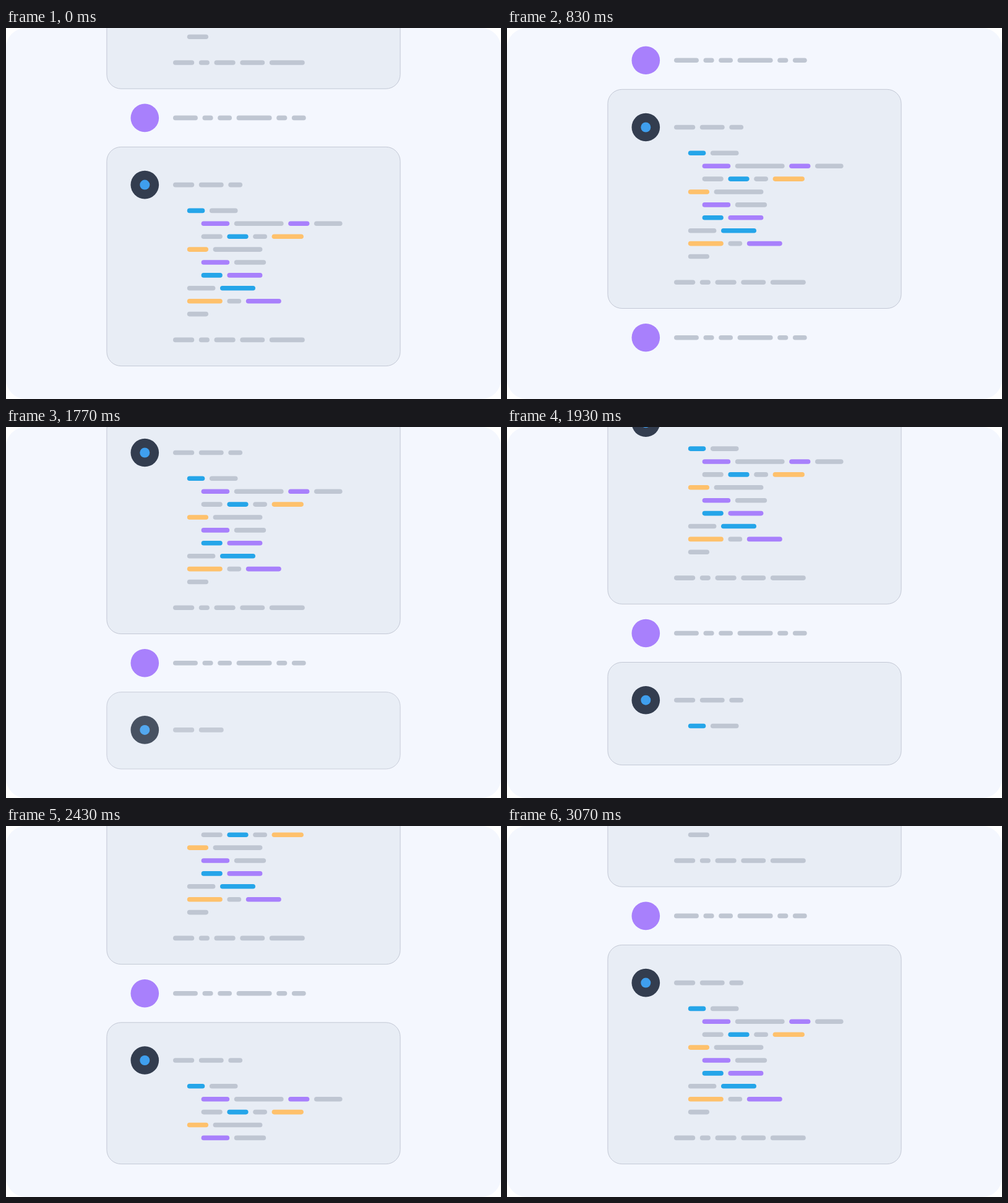
These frames come from a looping animation (800 by 600 pixels, 4100 ms). An HTML page:

```html
<!DOCTYPE html>
<html lang="en">
<head>
<meta charset="utf-8">
<title>Chat scroll</title>
<style>
  html, body { margin: 0; width: 100%; height: 100%; overflow: hidden; background: #fff; }
  svg { display: block; width: 100vw; height: 100vh; }
</style>
</head>
<body>
<svg id="stage" viewBox="0 0 800 600">
  <clipPath id="view"><rect width="800" height="570"/></clipPath>
  <rect width="800" height="600" rx="32" fill="#f4f7fe"/>
  <g clip-path="url(#view)"><g id="feed"></g></g>
</svg>
<script>
const LOOP = 4100, FPS = 30;
const UNIT = 1.9, LINE = 11 * UNIT, PERIOD = 236 * UNIT;
const CARD_TOP = 192.4, CARD_H = 354.2, USER_Y = 145.4;
const USER_STEP = 49 * UNIT, ENTER = 230, USER_AT = 122, CARD_AT = 1622;
const COLORS = { g: '#bfc6d2', b: '#25a5e9', p: '#a880fc', o: '#fec16c' };

// Each row: line number, indent, then colour + width of every dash (in units)
const USER = [0, 0, 'g21 g9 g12 g30 g9 g12'];
const ROWS = [
  [0, 0, 'g18 g21 g12'],
  [2, 12, 'b15 g24'],
  [3, 24, 'p24 g42 p18 g24'],
  [4, 24, 'g18 b18 g12 o27'],
  [5, 12, 'o18 g42'],
  [6, 24, 'p24 g27'],
  [7, 24, 'b18 p30'],
  [8, 12, 'g24 b30'],
  [9, 12, 'o30 g12 p30'],
  [10, 12, 'g18'],
  [12, 0, 'g18 g9 g18 g21 g30']
];

const feed = document.getElementById('feed');

function add(parent, tag, attrs) {
  const el = document.createElementNS('http://www.w3.org/2000/svg', tag);
  for (const key in attrs) el.setAttribute(key, attrs[key]);
  return parent.appendChild(el);
}

function addDashes(parent, [line, indent, spec], y) {
  let x = 270 + indent * UNIT;
  return spec.split(' ').map(s => {
    const width = s.slice(1) * UNIT;
    const dash = add(parent, 'rect', {
      x, y: y + line * LINE - 2 * UNIT, width, height: 4 * UNIT,
      rx: 2 * UNIT, fill: COLORS[s[0]]
    });
    x += width + 4 * UNIT;
    return dash;
  });
}

function addAvatar(parent, y, fill) {
  add(parent, 'circle', { cx: 224.3, cy: y, r: 22.8, fill });
}

function addUser(y) {
  const g = add(feed, 'g');
  addAvatar(g, y, COLORS.p);
  return { g, dashes: addDashes(g, USER, y) };
}

function addCard(top) {
  const g = add(feed, 'g'), y = top + 61.2;
  const box = add(g, 'rect', {
    x: 162.9, y: top, width: 474.2, height: CARD_H, rx: 23,
    fill: '#e8edf5', stroke: '#c3c8d5', 'stroke-width': 1
  });
  addAvatar(g, y, '#333d4f');
  add(g, 'circle', { cx: 224.3, cy: y, r: 8, fill: '#3f9fee' });
  return { g, box, rows: ROWS.map(row => addDashes(g, row, y)) };
}

const oldCard = addCard(CARD_TOP - PERIOD);
addUser(USER_Y);
addCard(CARD_TOP);
const user = addUser(USER_Y + PERIOD);
const card = addCard(CARD_TOP + PERIOD);

// Typing schedule, one step per tick
const typed = [], breaks = [];
user.dashes.forEach((el, i) => typed.push({ el, at: i ? 10 + 2 * i : 0 }));
let tick = 52;
card.rows.forEach((dashes, r) => {
  if (r === 6) tick++;
  if (r) breaks.push({ at: tick++, lines: r === 10 ? 2 : 1 });
  dashes.forEach(el => typed.push({ el, at: tick++ }));
});

const progress = (t, from) => Math.min(1, Math.max(0, (t - from) / ENTER));
const easeOut = (p, power) => 1 - (1 - p) ** power;
const show = (el, on) => el.setAttribute('visibility', on ? 'visible' : 'hidden');

function draw(ms) {
  const n = Math.floor((ms + 3.4) * FPS / 1000);
  const t = n * 1000 / FPS;
  const userP = progress(t, USER_AT), cardP = progress(t, CARD_AT);

  const lines = breaks.reduce((sum, b) => sum + (n >= b.at ? b.lines : 0), 0);
  const left = (11 - lines) * LINE;
  const cardStep = PERIOD - 11 * LINE - USER_STEP;
  const scroll = USER_STEP * easeOut(userP, 3) + cardStep * easeOut(cardP, 3) + lines * LINE;

  feed.setAttribute('transform', `translate(0 ${-scroll})`);
  card.box.setAttribute('height', CARD_H - left);
  user.g.setAttribute('opacity', easeOut(userP, 2.2));
  card.g.setAttribute('opacity', easeOut(cardP, 2.2));
  oldCard.g.setAttribute('display', n < 25 ? 'inline' : 'none');
  typed.forEach(d => show(d.el, n >= d.at));
}

const start = performance.now();
function loop() {
  draw((performance.now() - start) % LOOP);
  requestAnimationFrame(loop);
}
loop();
</script>
</body>
</html>
```
